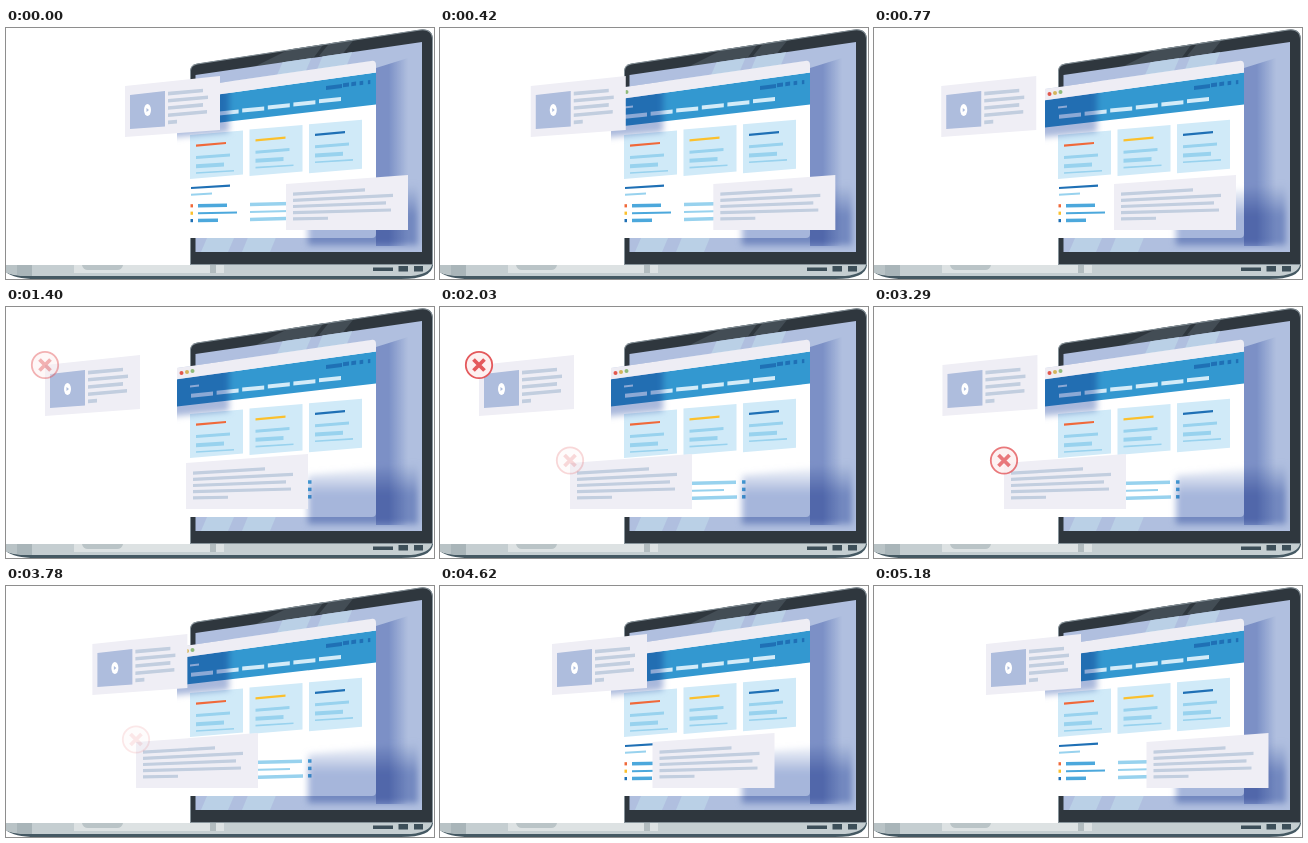
Recreate the animation shown at these times as an HTML page. Size 428x251 px, loop 5250 ms.

```html
<!DOCTYPE html>
<html>
<head>
<meta charset="utf-8">
<style>
html, body { margin: 0; height: 100%; overflow: hidden; background: #fff; }
svg { display: block; width: 428px; height: 251px; }
.shade { mix-blend-mode: multiply; }
</style>
</head>
<body>
<svg viewBox="0 0 428 251">
  <defs>
    <filter id="soft" x="-30%" y="-30%" width="160%" height="160%"><feGaussianBlur stdDeviation="3"/></filter>
    <linearGradient id="down" x2="0" y2="1">
      <stop offset=".05" stop-color="#a6b6db" stop-opacity=".1"/><stop offset=".5" stop-color="#a6b6db"/>
    </linearGradient>
    <linearGradient id="across">
      <stop stop-color="#b3c1e3"/><stop offset=".4" stop-color="#b3c1e3"/><stop offset="1" stop-color="#b3c1e3" stop-opacity="0"/>
    </linearGradient>
    <path id="lid" d="M184 237V43Q184 37 191 35.500L414 1.500Q427 0 427 12V237Z"/>
    <clipPath id="lidClip"><use href="#lid"/></clipPath>
    <clipPath id="screenClip"><path d="M189.500 47L416 14V224H189.500Z"/></clipPath>
    <clipPath id="pageClip"><path d="M171 61L365 33Q370 32 370 37V206Q370 210 366 210H171Z"/></clipPath>
    <g id="cross" stroke="#e4595c">
      <circle r="13.200" fill="#fdf0f0" stroke-width="1.800"/>
      <path d="M-5.500 -5.500L5.500 5.500M5.500 -5.500L-5.500 5.500" stroke-width="3.800"/>
    </g>
  </defs>

  <!-- laptop -->
  <g clip-path="url(#lidClip)">
    <use href="#lid" fill="#2f373e"/>
    <path d="M290 18L320 13L306 32L246 40ZM326 12L350 9L335 28H313Z" fill="#434d55"/>
    <use href="#lid" fill="none" stroke="#87939a" stroke-width="2"/>
  </g>
  <g clip-path="url(#screenClip)">
    <path d="M189 10H417V225H189Z" fill="#b0bfdf"/>
    <path d="M287 10H314L222 224H195ZM324 10H352L264 224H236Z" fill="#bad0e6"/>
  </g>
  <path d="M0 237H427Q426 251 395 251H30Q8 251 0 244Z" fill="#455963"/>
  <path d="M0 237H426Q424 246 405 248H22Q5 248 0 244Z" fill="#c5ced1"/>
  <path d="M0 237H11V247Q3 246 0 244Z" fill="#b9c3c6"/>
  <path d="M11 237H26V248H18L11 247Z" fill="#a9b5b9"/>
  <path d="M68 237H218V245H68Z" fill="#dde2e3"/>
  <path d="M204 237H210V245H204Z" fill="#b2bcbf"/>
  <path d="M76 237H117Q116 242 111 242H82Q77 242 76 237Z" fill="#bac4c7"/>
  <path d="M367 239.500H387V243H367ZM392.500 238H402V243.500H392.500ZM408 238H417V243.500H408Z" fill="#3d4f59"/>

  <!-- web page -->
  <g clip-path="url(#pageClip)">
    <path d="M171 30H370V210H171Z" fill="#fff"/>
    <path d="M171 72.300L370 44.600V76.500L171 99.500Z" fill="#3398d0"/>
    <g id="page"></g>
    <path class="shade" d="M160 58L223 50V104L160 110Z" fill="#a9b8db" filter="url(#soft)"/>
    <path d="M171 61L370 32V44.600L171 72.300Z" fill="#eeedf4"/>
    <circle cx="175.500" cy="66" r="2" fill="#e2574c"/>
    <circle cx="181" cy="65" r="2" fill="#d5b45c"/>
    <circle cx="186.500" cy="64" r="2" fill="#8fba7a"/>
  </g>

  <!-- shadows on the screen -->
  <g class="shade" clip-path="url(#screenClip)">
    <path d="M370 40L402 30V218H370Z" fill="url(#across)"/>
  </g>
  <g class="shade" clip-path="url(#screenClip)">
    <path d="M302 168L412 157V217H302Z" fill="url(#down)" filter="url(#soft)"/>
  </g>

  <!-- floating panels, drawn at their starting places -->
  <g id="video">
    <path d="M119 58L214 48V102L119 109Z" fill="#efeef5"/>
    <path d="M124 67L159 63V98.500L124 101Z" fill="#aebddd"/>
    <ellipse cx="141.500" cy="82" rx="3.500" ry="6" fill="#fff"/>
    <path d="M140.500 80L143 82L140.500 84Z" fill="#aebddd"/>
  </g>
  <g id="text">
    <path d="M280 156L402 147V202H280Z" fill="#efeef5"/>
  </g>
  <use id="crossA" href="#cross" x="39" y="58"/>
  <use id="crossB" href="#cross" x="130" y="153.500"/>
</svg>
<script>
const $ = id => document.getElementById(id);
const navy = "#1f70b5", blue = "#4ca8dc", sky = "#98d2ee", grey = "#c2cedf";
const orange = "#f0693a", yellow = "#fbc02d", pale = "#d3ebf8";

// slanted bar with upright ends; y is the middle of its left end
function bar(id, color, x, y, w, h, slope) {
  const p = document.createElementNS("http://www.w3.org/2000/svg", "path");
  p.setAttribute("d", `M${x} ${y - h / 2}l${w} ${w * slope}v${h}l${-w} ${-w * slope}Z`);
  p.setAttribute("fill", color);
  $(id).append(p);
}

// header
bar("page", navy, 320, 60, 16, 4, -.12);
for (let i = 0; i < 4; i++) bar("page", navy, 337 + 8.3 * i, 57.2 - i, 6 - 1.2 * i, 4, -.12);
bar("page", pale, 184, 79.5, 9, 2, -.12);
for (let i = 0; i < 6; i++) bar("page", pale, 185 + 25.6 * i, 88.8 - 3.1 * i, 22, 4, -.1);

// cards
[orange, yellow, navy].forEach((accent, i) => {
  const x = 184 + 59.5 * i, y = 107 - 5.4 * i, h = 44 + 2.5 * i;
  bar("page", "#d0eaf8", x, y + h / 2, 53, h, -.085);
  bar("page", accent, x + 6, y + 10.7, 30, 2.2, -.09);
  bar("page", sky, x + 6, y + 22.6, 34, 3, -.08);
  bar("page", sky, x + 6, y + 31.2, 28, 4, -.06);
  bar("page", sky, x + 6, y + 38, 38, 1.6, -.06);
});

// list below the cards
bar("page", navy, 185, 160, 39, 2.2, -.06);
bar("page", sky, 185, 166.7, 21, 2, -.06);
[orange, yellow, navy].forEach((dot, i) => {
  const y = 177.8 + 7.4 * i, h = i === 1 ? 2 : 3.5;
  bar("page", dot, 184.5, y, 2.5, 3.2, 0);
  bar("page", blue, 192, y, [29, 39, 20][i], h, -.02);
  bar("page", sky, 244, y - 1.2, [52, 40, 53][i], h, -.025);
  bar("page", blue, 302, y - 2.8, 3.5, 3.5, 0);
});

// panel text lines
[35, 40, 35, 39, 9].forEach((w, i) => bar("video", grey, 162, 65.6 + 7.2 * i, w, 3.6, -.09));
[72, 100, 93, 98, 35].forEach((w, i) => bar("text", grey, 287, 166.2 + 6.15 * i, w, 3.2, -.06 + .011 * i));

const clamp = v => Math.min(1, Math.max(0, v));
const ramp = (t, from, to) => clamp((t - from) / (to - from));

const loop = 5250, step = 70, start = performance.now();

function draw() {
  const t = Math.floor((performance.now() - start) % loop / step) * step;
  const videoX = -80 * ramp(t, 0, 1190) + 73 * ramp(t, 2485, 4480);
  const textX = -150 * ramp(t, 350, 1925) + 150 * ramp(t, 3850, loop);
  $("video").setAttribute("transform", `translate(${videoX})`);
  $("text").setAttribute("transform", `translate(${textX})`);
  $("crossA").setAttribute("opacity", ramp(t, 1190, 1640) - ramp(t, 2100, 2800));
  $("crossB").setAttribute("opacity", ramp(t, 1925, 2375) - ramp(t, 3150, 3880));
  requestAnimationFrame(draw);
}
draw();
</script>
</body>
</html>
```
